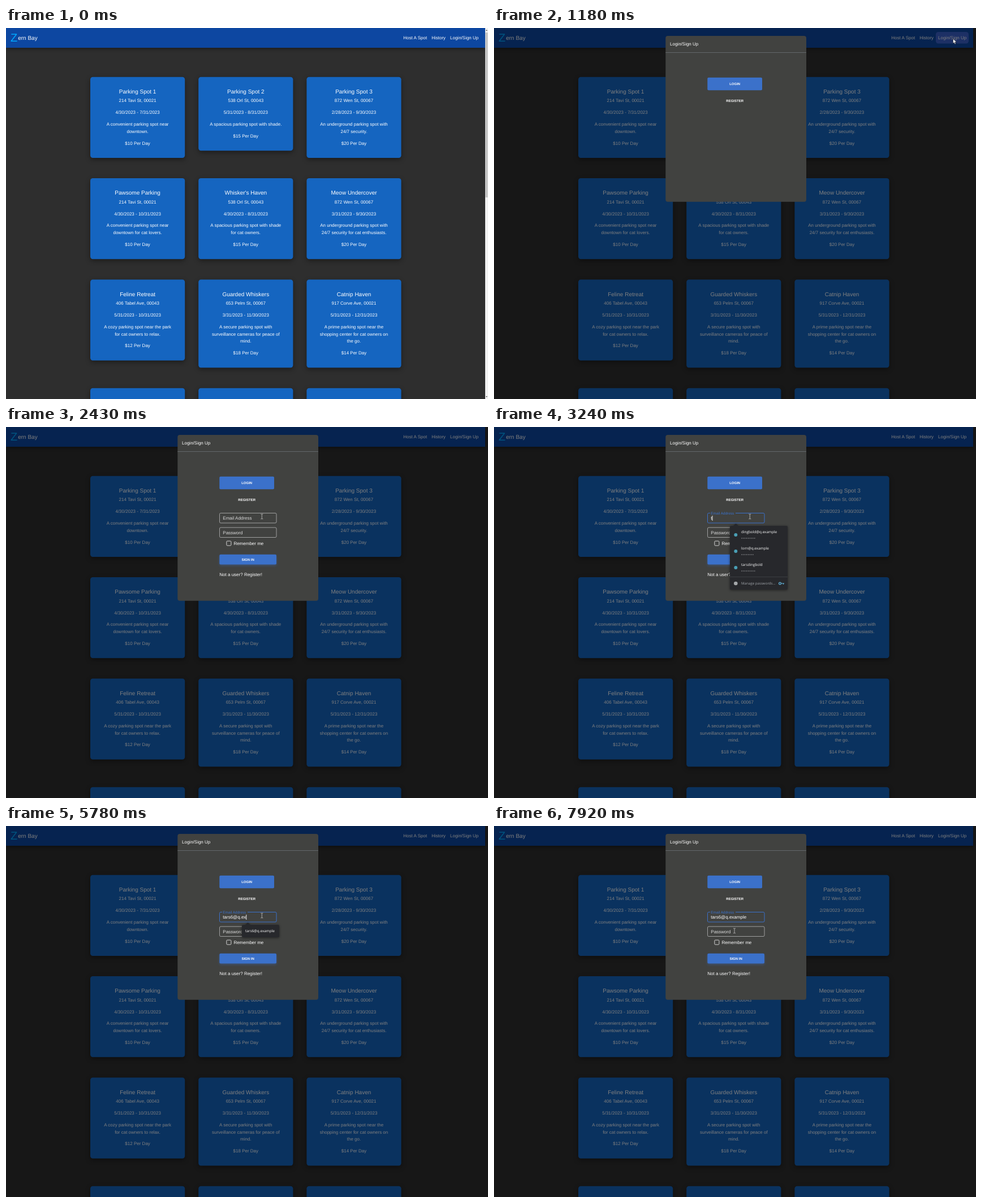
Write an HTML page that moves like this. It is 852 px wide and 657 px high and loops after 7990 ms.

```html
<!DOCTYPE html>
<html lang="en">
<head>
<meta charset="utf-8">
<title>Parking spots</title>
<style>
  html, body { margin: 0; width: 100%; height: 100%; overflow: hidden; background: #2e2e2e; }
  svg { display: block; width: 852px; height: 657px; }
  text { font-family: "Liberation Sans", Arial, sans-serif; font-size: 8px; fill: #fff; text-rendering: geometricPrecision; }
  .mid { text-anchor: middle; }
  .title { font-size: 10px; }
  .btn { font-size: 6px; font-weight: 700; text-anchor: middle; }
  .sys { font-family: "Open Sans", "Noto Sans", sans-serif; font-size: 6.4px; }
  .card { fill: #1565c0; filter: drop-shadow(0 3px 4px rgba(0, 0, 0, .4)); }
  .panel { fill: #27282c; filter: drop-shadow(0 1px 2px rgba(0, 0, 0, .5)); }
</style>
</head>
<body>
<svg viewBox="0 0 852 657" xmlns="http://www.w3.org/2000/svg">
  <rect width="852" height="657" fill="#2e2e2e"/>
  <g id="cards"></g>
  <rect width="847" height="35" fill="#0d47a1" style="filter:drop-shadow(0 2px 3px rgba(0,0,0,.4))"/>
  <rect id="pill" x="781" y="7" width="58" height="20.5" rx="4.5" fill="#3b60cc"/>
  <text x="8" y="24" style="font-size:20px;fill:#00a8ff">Z</text>
  <text class="title" x="21.2" y="20.7">ern Bay</text>
  <text x="702.3" y="19.8">Host A Spot</text>
  <text x="752.2" y="19.8">History</text>
  <text x="785" y="19.8">Login/Sign Up</text>
  <g id="scrollbar">
    <rect x="847" width="5" height="657" fill="#f1f1f1"/>
    <rect x="847.5" y="8" width="4" height="292" fill="#c1c1c1"/>
    <path d="M848 5h3l-1.5-2zM848 652h3l-1.5 2z" fill="#505050"/>
  </g>

  <g id="modal">
    <rect width="852" height="657" fill="#000" opacity=".5"/>
    <rect x="303.3" y="14" width="248.7" height="293.7" rx="4" fill="#414240"/>
    <text x="311" y="31">Login/Sign Up</text>
    <path d="M303.3 43.5H552" stroke="#63676a"/>
    <rect x="377.3" y="87.8" width="96.7" height="22.4" rx="2" fill="#3b71ca"/>
    <text class="btn" x="425.7" y="101.2">LOGIN</text>
    <text class="btn" x="425.7" y="131.3">REGISTER</text>

    <g id="form">
      <rect id="email" x="377.5" y="152.5" width="100.5" height="17.5" rx="2" fill="none"/>
      <rect id="notch" y="151.5" height="2" fill="#414240"/>
      <text id="label">Email Address</text>
      <text id="typed" x="383.3" y="163.8"></text>
      <rect id="caret" y="157" width=".9" height="9" fill="#fff"/>
      <rect x="377.5" y="178" width="100.5" height="17.5" rx="2" fill="none" stroke="#b8b8b8" stroke-width=".8"/>
      <text x="383.3" y="189.7" style="fill:#dcdcdc">Password</text>
      <rect x="389.9" y="202" width="8" height="8" rx="1.3" fill="none" stroke="#d5d5d5"/>
      <text x="402.4" y="208.6">Remember me</text>
      <rect x="377.3" y="225.8" width="100.7" height="17.8" rx="2" fill="#3b71ca" style="filter:drop-shadow(0 2px 2px rgba(59,113,202,.35))"/>
      <text class="btn" x="427.6" y="237">SIGN IN</text>
      <text x="377.3" y="264.4">Not a user? Register!</text>
    </g>
    <g id="accounts"></g>
    <g id="suggestion">
      <path class="panel" d="M419 175h4l4.500-4 4.500 4h49a2 2 0 0 1 2 2v18a2 2 0 0 1-2 2h-62a2 2 0 0 1-2-2v-18a2 2 0 0 1 2-2z"/>
      <text class="sys" x="423" y="188.3">tars6@q.example</text>
    </g>
  </g>

  <circle id="click" r="6" fill="#d2c838" opacity=".75"/>
  <g id="cursor">
    <path id="arrow" d="M0 0V8.300L1.900 6.600 3.200 9.500 4.600 8.900 3.300 6.100H5.900Z" fill="#fff" stroke="#111" stroke-width=".5"/>
    <path id="hand" d="M-.9-1Q0-2 .9-1V3L4 3.600Q5.200 4 5 5.300L4.300 9.500H-.5L-3 5.600Q-2.600 4.300-.9 5.600Z" fill="#fff" stroke="#222" stroke-width=".5"/>
    <path id="beam" d="M-2-4.300h1.400L0-3.700l.6-.6H2M0-3.700V3.700M-2 4.300h1.400L0 3.700l.6.6H2" fill="none" stroke="#c8c8c8" stroke-width=".8"/>
  </g>
</svg>
<script>
const LOOP = 7990, TICK = 70;
const OPEN = 1180, FOCUS = 2440;
const ADDRESS = "tars6@q.example";
const KEY_TIMES = [3240, 3380, 3580, 3710, 4040, 4520, 5120, 5520, 5650, 5780, 6050, 6310, 6510, 6640, 6910];
// start, end, from x, y, to x, y
const MOVES = [
  [70, 840, 836, 640, 810, 26],
  [910, 980, 810, 26, 811.5, 19],
  [1250, 1740, 811.5, 19, 557.5, 143],
  [2010, 2010, 557.5, 143, 548.5, 149],
  [2080, 2440, 548.5, 149, 452.3, 158.5],
  [7440, 7580, 452.3, 158.5, 470.5, 164.5],
  [7780, 7920, 470.5, 164.5, 425, 185.5]
];
// title, street, dates, description, price
const CARDS = [
  ["Parking Spot 1", "214 Tavi St, 00021", "4/30/2023 - 7/31/2023", "A convenient parking spot near|downtown.", 10],
  ["Parking Spot 2", "538 Orl St, 00043", "5/31/2023 - 8/31/2023", "A spacious parking spot with shade.", 15],
  ["Parking Spot 3", "872 Wen St, 00067", "2/28/2023 - 9/30/2023", "An underground parking spot with|24/7 security.", 20],
  ["Pawsome Parking", "214 Tavi St, 00021", "4/30/2023 - 10/31/2023", "A convenient parking spot near|downtown for cat lovers.", 10],
  ["Whisker's Haven", "538 Orl St, 00043", "4/30/2023 - 8/31/2023", "A spacious parking spot with shade|for cat owners.", 15],
  ["Meow Undercover", "872 Wen St, 00067", "3/31/2023 - 9/30/2023", "An underground parking spot with|24/7 security for cat enthusiasts.", 20],
  ["Feline Retreat", "406 Tabel Ave, 00043", "5/31/2023 - 10/31/2023", "A cozy parking spot near the park|for cat owners to relax.", 12],
  ["Guarded Whiskers", "653 Pelm St, 00067", "3/31/2023 - 11/30/2023", "A secure parking spot with|surveillance cameras for peace of|mind.", 18],
  ["Catnip Haven", "917 Corve Ave, 00021", "5/31/2023 - 12/31/2023", "A prime parking spot near the|shopping center for cat owners on|the go.", 14]
];
const ROW_TOPS = [86.7, 266, 445.4, 637.7];

const $ = id => document.getElementById(id);
const clamp = v => Math.max(0, Math.min(1, v));
const lerp = (a, b, p) => a + (b - a) * p;
const ease = p => p < .5 ? 4 * p ** 3 : 1 - 4 * (1 - p) ** 3;
const show = (id, on) => $(id).setAttribute("visibility", on ? "inherit" : "hidden");
const set = (id, attrs) => {
  for (const name in attrs) $(id).setAttribute(name, attrs[name]);
};

function cardMarkup(index) {
  const x = 149 + index % 3 * 191.2, y = ROW_TOPS[Math.floor(index / 3)];
  const [title, street, dates, about, price] = CARDS[index] || [];
  const lines = about ? about.split("|") : [""];
  const text = (dy, content, cls = "") => `<text class="mid ${cls}" x="${x + 83.6}" y="${y + dy}">${content}</text>`;
  let out = `<rect class="card" x="${x}" y="${y}" width="167.2" height="${117.7 + lines.length * 12.8}" rx="4.5"/>`;
  if (!title) return out;
  out += text(29.3, title, "title") + text(44.7, street) + text(65.5, dates);
  lines.forEach((line, i) => out += text(86.3 + i * 12.8, line));
  return out + text(94.3 + lines.length * 12.8, `$${price} Per Day`);
}

function accountsMarkup(entries) {
  const foot = 178 + entries.length * 29;
  let out = `<path class="panel" d="M419 175h4l4.500-4 4.500 4h85a2 2 0 0 1 2 2V${foot + 21}a2 2 0 0 1-2 2h-98a2 2 0 0 1-2-2V177a2 2 0 0 1 2-2z"/>`;
  entries.forEach(([name, dots], i) => {
    const y = 188.3 + i * 29;
    out += `<circle cx="427.3" cy="${y + 2.7}" r="3" fill="#4a9fb5"/><text class="sys" x="437" y="${y}">${name}</text>
      <path d="M438 ${y + 8.7}h${(dots - 1) * 2.85 + .1}" stroke="#b5b7ba" stroke-width="1.3" stroke-linecap="round" stroke-dasharray="0 2.85"/>`;
  });
  return out + `<path d="M417 ${foot + .5}h102" stroke="#46484c" stroke-width=".7"/>
    <circle cx="427.3" cy="${foot + 12}" r="3.3" fill="#a4a7aa"/>
    <text class="sys" x="437" y="${foot + 14.300}" style="font-size:6.2px;fill:#a0a5aa">Manage passwords...</text>
    <g fill="none" stroke="#62b4dc" stroke-width="1.2"><circle cx="505.500" cy="${foot + 12}" r="1.9"/><path d="M507.500 ${foot + 12}h5.500m-1.500 0v1.800"/></g>`;
}

$("cards").innerHTML = ROW_TOPS.flatMap((_, row) => [0, 1, 2].map(col => cardMarkup(row * 3 + col))).join("");

const ALL = [["dingbold@q.example", 9], ["lorn@q.example", 8], ["tarsdingbold", 9]];
const LISTS = { all: accountsMarkup(ALL), matching: accountsMarkup(ALL.slice(2)) };
let shownList, shownText;

function cursorAt(t) {
  const [start, end, x0, y0, x1, y1] = MOVES.filter(m => t >= m[0]).pop() || MOVES[0];
  const steps = Math.floor((Math.min(t, end) - start) / TICK) + 1;
  const p = ease(clamp(steps * TICK / (end - start + TICK)));
  return [lerp(x0, x1, p), lerp(y0, y1, p)];
}

function drawField(t) {
  const focused = t >= FOCUS;
  const lift = clamp((t - FOCUS) / 200);
  const size = lerp(8, 6.4, lift);
  set("email", { stroke: focused ? "#3b71ca" : "#b8b8b8", "stroke-width": focused ? 1 : .8 });
  set("notch", { x: lerp(404, 382, lift), width: 45 * lift });
  set("label", { x: 383.3, y: lerp(164.2, 155, lift), style: `font-size:${size}px;fill:${focused ? "#3b71ca" : "#dcdcdc"}` });

  const pressed = KEY_TIMES.filter(k => t >= k);
  const text = ADDRESS.slice(0, pressed.length);
  if (text !== shownText) $("typed").textContent = shownText = text;
  const lastKey = pressed.length ? pressed[pressed.length - 1] : FOCUS;
  set("caret", { x: 383.3 + (text ? $("typed").getComputedTextLength() : 0) });
  show("caret", focused && (t - lastKey) % 1060 < 530);
}

function drawPopups(t) {
  const list = t < 3310 ? "all" : "matching";
  if (list !== shownList) $("accounts").innerHTML = LISTS[shownList = list];
  show("accounts", t >= 2510 && t < 4110);
  show("suggestion", t >= 4110 && t < 7110);
  set("suggestion", { opacity: 1 - clamp((t - 6950) / 160) });
}

function drawCursor(t) {
  const [x, y] = cursorAt(t);
  const inField = t > OPEN && x > 377 && x < 478 && (y > 152 && y < 170 || y > 178 && y < 196);
  const onLink = t >= 910 && t < OPEN;
  set("cursor", { transform: `translate(${x} ${y})` });
  set("click", { cx: x - .5, cy: y + 1 });
  show("cursor", t >= 70);
  show("beam", inField);
  show("hand", onLink);
  show("arrow", !inField && !onLink);
  show("click", t >= 980 && t < OPEN);
}

function draw(t) {
  const open = t >= OPEN;
  show("modal", open);
  show("scrollbar", !open);
  show("pill", t >= 910);
  set("pill", { opacity: 1 - clamp((t - 1250) / 210) });
  set("form", { opacity: clamp((t - 1250) / 150) });
  drawField(t);
  drawPopups(t);
  drawCursor(t);
  if (!open) ["caret", "accounts", "suggestion"].forEach(id => show(id, false));
}

const began = performance.now();
function frame() {
  draw((performance.now() - began) % LOOP);
  requestAnimationFrame(frame);
}
frame();
</script>
</body>
</html>
```
